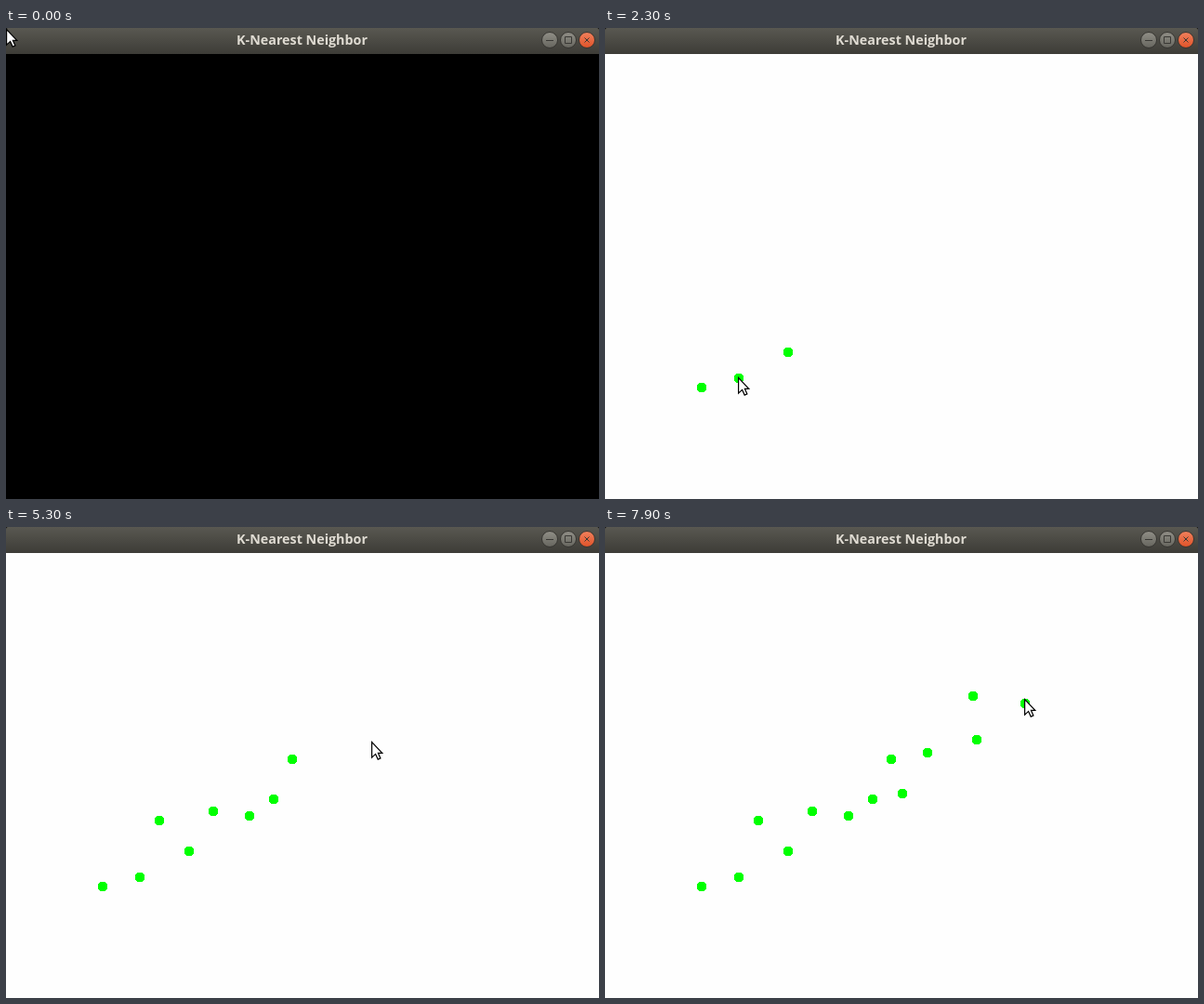
Recreate the animation shown at these times as an HTML page. Size 638 px wide and 507 px high, loop 8000 ms.

```html
<!DOCTYPE html>
<html lang="en">
<head>
<meta charset="utf-8">
<title>K-Nearest Neighbor</title>
<style>
  html, body { margin: 0; width: 100%; height: 100%; overflow: hidden; background: #000; }
  svg { display: block; }
  .title { font: bold 14.3px "Open Sans", "Noto Sans", sans-serif; fill: #dfdbd2; text-anchor: middle; }
  .button { stroke: #353430; }
  .icon { fill: none; stroke: #3a3935; }
  #dots { fill: #0f0; shape-rendering: crispEdges; }
</style>
</head>
<body>
<svg width="638" height="507" viewBox="0 0 638 507">
  <defs>
    <linearGradient id="bar" x2="0" y2="1">
      <stop stop-color="#595851"/><stop offset="1" stop-color="#3d3c37"/>
    </linearGradient>
    <linearGradient id="grey" x2="0" y2="1">
      <stop stop-color="#918f87"/><stop offset="1" stop-color="#66655e"/>
    </linearGradient>
    <linearGradient id="orange" x2="0" y2="1">
      <stop stop-color="#f1815d"/><stop offset="1" stop-color="#df5228"/>
    </linearGradient>
  </defs>

  <rect id="page" y="28" width="638" height="479" fill="#fefefe"/>
  <path d="M0 28V2Q0 0 2 0H636Q638 0 638 2V28Z" fill="url(#bar)"/>
  <text class="title" x="318.5" y="18">K-Nearest Neighbor</text>

  <g class="button">
    <circle cx="585" cy="13" r="8.5" fill="url(#grey)"/>
    <circle cx="605" cy="13" r="8.5" fill="url(#grey)"/>
    <circle cx="625" cy="13" r="8.5" fill="url(#orange)"/>
  </g>
  <path class="icon" d="M581 13.5h8M601.5 9.5h7v7h-7zM622.5 10.5l5 5m0-5l-5 5"/>

  <g id="dots"></g>
  <path id="cursor" d="M.6 1.5V18.2L4.6 14.4 7.2 20.1 9.9 18.9 7.4 13.3H11.8Z"
        fill="#fff" stroke="#000" stroke-width="1.2"/>
</svg>

<script>
const TICK = 100, TICKS = 80, GLIDE = 4;

// Key points of the pointer: tick, x, y; it clicks at each unless only hovering
const stops = [
  [0, 189, 250, "hover"],
  [4, 131, 364, "hover"],
  [10, 103, 385],
  [16, 196, 347],
  [23, 143, 375],
  [29, 164, 314],
  [35, 261, 309],
  [39, 307, 248],
  [44, 222, 304],
  [50, 287, 291],
  [54, 399, 227],
  [58, 395, 180],
  [63, 346, 241],
  [67, 343, 268, "hover"],
  [70, 319, 285],
  [72, 338, 273, "hover"],
  [76, 451, 188],
  [79, 451, 184, "hover"],
].map(([tick, x, y, hover]) => ({ tick, x, y, hover }));

const byId = id => document.getElementById(id);
const page = byId("page"), cursor = byId("cursor");
const show = (element, visible) => element.setAttribute("visibility", visible ? "visible" : "hidden");
const easeOut = u => 1 - (1 - u) ** 2.1;

// Every click leaves a dot under the pointer tip
const dots = stops.filter(stop => !stop.hover).map(({ tick, x, y }) => {
  const circle = document.createElementNS("http://www.w3.org/2000/svg", "circle");
  circle.setAttribute("cx", x + 1);
  circle.setAttribute("cy", y + 2);
  circle.setAttribute("r", 5.4);
  byId("dots").append(circle);
  return { circle, tick };
});

// The pointer rests for 40% of each gap, then glides to the next stop
function pointerAt(tick) {
  const next = stops.findIndex(stop => stop.tick >= tick);
  const to = stops[next], from = stops[next - 1] || to;
  const gap = to.tick - from.tick;
  const rest = Math.max(1, Math.floor(gap * 0.4));
  const steps = Math.min(GLIDE, gap - rest + 1);
  const progress = (tick - from.tick - rest + 1) / steps;
  const k = easeOut(Math.max(0, Math.min(1, progress)));
  return [from.x + (to.x - from.x) * k, from.y + (to.y - from.y) * k].map(Math.round);
}

function draw(now) {
  const tick = Math.floor(now / TICK) % TICKS;
  show(page, tick >= dots[0].tick);
  for (const dot of dots) show(dot.circle, tick >= dot.tick);
  cursor.setAttribute("transform", `translate(${pointerAt(tick)})`);
}

const origin = performance.now();
function loop() {
  draw(performance.now() - origin);
  requestAnimationFrame(loop);
}
loop();
</script>
</body>
</html>
```
